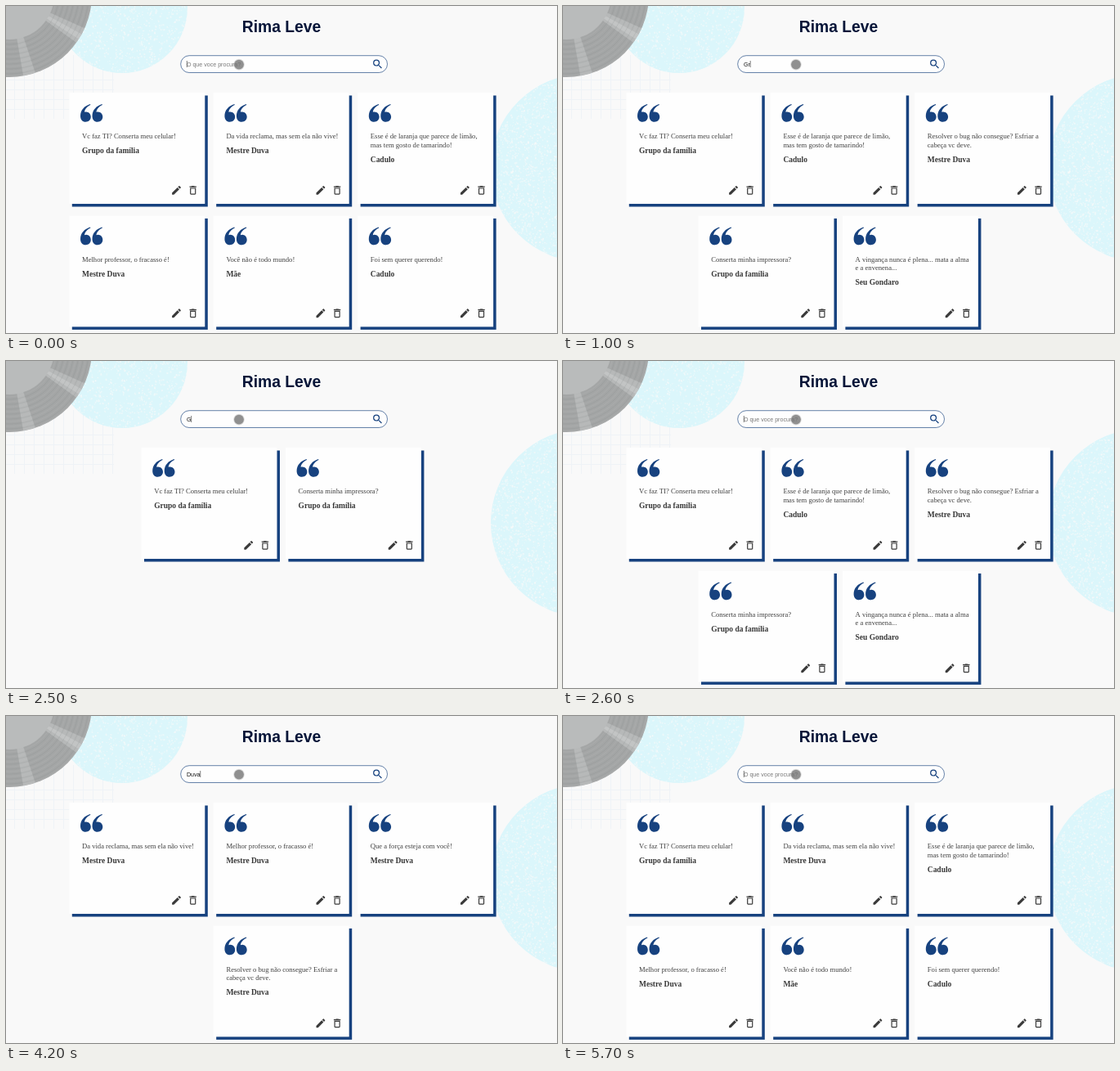
An HTML page with a canvas for the animation above (8 s loop, 674 px wide and 400 px high).

```html
<!DOCTYPE html>
<html lang="pt-BR">
<head>
<meta charset="utf-8">
<title>Rima Leve</title>
<style>
  html, body { margin: 0; width: 674px; height: 400px; overflow: hidden; background: #f9f9f9; }
  canvas { display: block; }
</style>
</head>
<body>
<canvas id="stage" width="674" height="400"></canvas>
<script>
const W = 674, H = 400, LOOP = 8000;
const BLUE = '#17427f', TAU = Math.PI * 2;
const SERIF = '"Liberation Serif", "Times New Roman", serif';
const SANS = '"Liberation Sans", Arial, sans-serif';

const quotes = {
  phone: [['Vc faz TI? Conserta meu celular!'], 'Grupo da família'],
  life: [['Da vida reclama, mas sem ela não vive!'], 'Mestre Duva'],
  juice: [['Esse é de laranja que parece de limão,', 'mas tem gosto de tamarindo!'], 'Cadulo'],
  teacher: [['Melhor professor, o fracasso é!'], 'Mestre Duva'],
  world: [['Você não é todo mundo!'], 'Mãe'],
  oops: [['Foi sem querer querendo!'], 'Cadulo'],
  bug: [['Resolver o bug não consegue? Esfriar a', 'cabeça vc deve.'], 'Mestre Duva'],
  printer: [['Conserta minha impressora?'], 'Grupo da família'],
  revenge: [['A vingança nunca é plena... mata a alma', 'e a envenena...'], 'Seu Gondaro'],
  force: [['Que a força esteja com você!'], 'Mestre Duva']
};

const lists = {
  all: ['phone', 'life', 'juice', 'teacher', 'world', 'oops'],
  letter: ['phone', 'juice', 'bug', 'printer', 'revenge'],
  group: ['phone', 'printer'],
  master: ['life', 'teacher', 'force', 'bug']
};

// start time, typed text, visible list, caret
const steps = [
  [0, '', 'all', 1], [100, 'G', 'all', 1], [300, 'G', 'letter', 1], [800, 'Gr', 'letter', 1],
  [1300, 'Grup', 'group', 1], [1600, 'Grupo', 'group', 1], [2500, 'G', 'group', 1],
  [2600, '', 'letter', 1], [2700, '', 'all', 1], [3500, 'D', 'all', 1],
  [3700, 'Du', 'master', 1], [4200, 'Duva', 'master', 1], [5100, 'Duv', 'master', 0],
  [5300, 'D', 'master', 1], [5500, '', 'master', 1], [5600, '', 'all', 1]
];

const mark = new Path2D('M12 0C5 2 0 7.5 0 14.5C0 19 2.5 21.8 6.4 21.8C10.2 21.8 12.8 19.2 12.8 15.6C12.8 12.2 10.3 9.4 7 9.4C6.2 9.4 5.5 9.6 5 9.8C5.3 6.5 8 3 12.4 1Z');
const pencil = new Path2D('M3 17.25V21h3.75L17.81 9.94l-3.75-3.75L3 17.25zM20.71 7.04a1 1 0 0 0 0-1.41l-2.34-2.34a1 1 0 0 0-1.41 0l-1.83 1.83 3.75 3.75 1.83-1.83z');
const bin = new Path2D('M6 19c0 1.1.9 2 2 2h8c1.1 0 2-.9 2-2V7H6zM8 9h8v10H8zM15.5 4l-1-1h-5l-1 1H5v2h14V4z');
const lens = new Path2D('M15.5 14h-.79l-.28-.27A6.47 6.47 0 0 0 16 9.5 6.5 6.5 0 1 0 9.5 16c1.61 0 3.09-.59 4.23-1.57l.27.28v.79l5 4.99L20.49 19zM9.5 14C7 14 5 12 5 9.5S7 5 9.5 5 14 7 14 9.5 12 14 9.5 14z');

const ctx = document.getElementById('stage').getContext('2d');

function seeded(seed) {
  return () => (seed = (seed * 16807) % 2147483647) / 2147483647;
}

function disc(c, x, y, r, color) {
  c.fillStyle = color;
  c.beginPath();
  c.arc(x, y, r, 0, TAU);
  c.fill();
}

function speckledDisc(c, x, y, r, count, seed) {
  const rnd = seeded(seed);
  c.save();
  disc(c, x, y, r, '#dbf6fb');
  c.clip();
  c.fillStyle = 'rgba(249,250,250,.6)';
  for (let i = 0; i < count; i++) {
    const a = rnd() * TAU, d = r * Math.sqrt(rnd());
    const s = 0.6 + 1.5 * rnd();
    c.fillRect(x + d * Math.cos(a), y + d * Math.sin(a), s, s);
  }
  c.restore();
}

function record(c) {
  const x = 4, y = -14, r = 101;
  disc(c, x, y, r, '#a4a6a6');
  c.save();
  c.clip();
  // soft shine across the grooves
  for (const [from, to] of [[0.42, 0.62], [0.5, 0.57], [1.25, 1.4]]) {
    c.fillStyle = 'rgba(215,218,218,.35)';
    c.beginPath();
    c.moveTo(x, y);
    c.arc(x, y, r, from, to);
    c.fill();
  }
  c.lineWidth = 0.6;
  for (let g = 58; g < r; g += 3) {
    c.strokeStyle = g % 2 ? 'rgba(125,128,128,.3)' : 'rgba(200,202,202,.25)';
    c.beginPath();
    c.arc(x, y, g, 0, TAU);
    c.stroke();
  }
  disc(c, x, y, 55, '#b9bbbb');
  c.restore();
}

function makeBackdrop() {
  const cv = document.createElement('canvas');
  cv.width = W;
  cv.height = H;
  const c = cv.getContext('2d');
  c.fillStyle = '#f9f9f9';
  c.fillRect(0, 0, W, H);
  c.fillStyle = '#eff3f7';
  for (let x = 10; x < 132; x += 12) c.fillRect(x, 60, 1, 78);
  for (let y = 90; y < 138; y += 12) c.fillRect(0, y, 132, 1);
  speckledDisc(c, 142, 2, 80, 1500, 71);
  speckledDisc(c, 708, 198, 115, 4200, 19);
  record(c);
  return cv;
}

function text(str, x, y, font, color, align = 'left') {
  ctx.font = font;
  ctx.fillStyle = color;
  ctx.textAlign = align;
  ctx.fillText(str, x, y);
}

function icon(path, x, y, scale, color) {
  ctx.save();
  ctx.translate(x, y);
  ctx.scale(scale, scale);
  ctx.fillStyle = color;
  ctx.fill(path, 'evenodd');
  ctx.restore();
}

function card([lines, author], x, y) {
  ctx.fillStyle = BLUE;
  ctx.fillRect(x + 3.5, y + 3.5, 166, 136);
  ctx.fillStyle = '#fefefe';
  ctx.fillRect(x, y, 166, 136);
  icon(mark, x + 13.7, y + 14, 1, BLUE);
  icon(mark, x + 28.2, y + 14, 1, BLUE);
  lines.forEach((line, i) => text(line, x + 15.7, y + 56.2 + i * 10.4, '8.6px ' + SERIF, '#404040'));
  text(author, x + 15.7, y + 64 + lines.length * 10.4, 'bold 9.47px ' + SERIF, '#383838');
  icon(pencil, x + 124, y + 112.2, 0.6, '#3a3a3a');
  icon(bin, x + 144.2, y + 112.2, 0.6, '#3a3a3a');
}

function cards(names) {
  names.forEach((name, i) => {
    const row = Math.floor(i / 3), inRow = Math.min(3, names.length - row * 3);
    const x = 253.7 + (i % 3 - (inRow - 1) / 2) * 176.4;
    card(quotes[name], x, 106 + row * 150.4);
  });
}

function search(typed, caret) {
  ctx.beginPath();
  ctx.roundRect(213.7, 60.7, 252.8, 20.8, 10.4);
  ctx.fillStyle = '#fefefe';
  ctx.fill();
  ctx.lineWidth = 0.8;
  ctx.strokeStyle = '#3f6293';
  ctx.stroke();
  const font = '7.1px ' + SANS;
  text(typed || 'O que voce procura?', 220.9, 73.6, font, typed ? '#151515' : '#777');
  if (caret) {
    const x = 220.9 + (typed ? ctx.measureText(typed).width : 0);
    ctx.fillStyle = '#444';
    ctx.fillRect(x, 67, 0.7, 8);
  }
  icon(lens, 447.2, 63.7, 0.62, BLUE);
  disc(ctx, 285, 71.6, 6.8, 'rgba(120,120,120,.25)');
  disc(ctx, 285, 71.6, 5.9, 'rgba(115,115,115,.72)');
}

const backdrop = makeBackdrop();

function draw(t) {
  const [, typed, list, caret] = steps.filter(s => s[0] <= t).pop();
  ctx.drawImage(backdrop, 0, 0);
  text('Rima Leve', 337, 32.2, 'bold 19.3px ' + SANS, '#071538', 'center');
  cards(lists[list]);
  search(typed, caret);
}

const start = performance.now();
function tick() {
  draw((performance.now() - start) % LOOP);
  requestAnimationFrame(tick);
}
tick();
</script>
</body>
</html>
```
